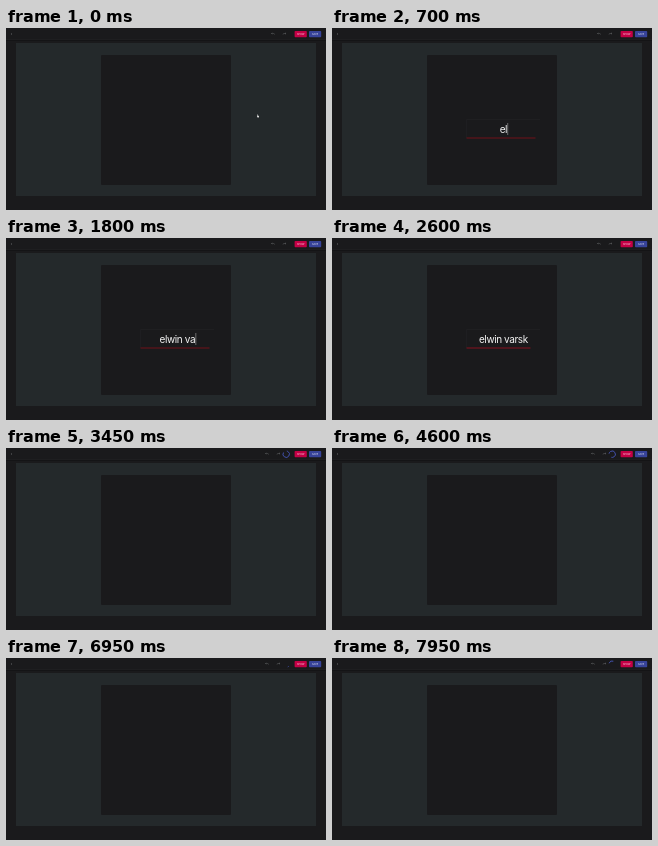
An HTML page for the animation above (8000 ms loop, 320 by 182 pixels).

```html
<!DOCTYPE html>
<html lang="en">
<head>
<meta charset="utf-8">
<title>Text editor</title>
<style>
  html, body { margin: 0; width: 100%; height: 100%; overflow: hidden; background: #1a1a1c; }
  svg { display: block; width: 100vw; height: 100vh; }
  text { font-family: Inter, "Liberation Sans", sans-serif; text-anchor: middle; }
  .label { font-size: 2.4px; font-weight: 500; fill: #fff; opacity: .75; }
  .icon { fill: none; stroke: #66686a; stroke-width: .5; }
</style>
</head>
<body>
<svg viewBox="0 0 320 182">
  <rect width="320" height="182" fill="#1a1a1c"/>
  <rect y="11" width="320" height="1" fill="#1e1e20"/>
  <rect y="12" width="320" height="1" fill="#141416"/>
  <path d="M6 5L5 6L6 7" class="icon"/>
  <g id="history" class="icon">
    <path d="M265.5 5.5h2q1 0 1 1M266.3 4.8l-.8.7l.8.7M280 5.5h-2q-1 0-1 1M279.2 4.8l.8.7l-.8.7"/>
  </g>
  <rect x="288.6" y="3" width="12.2" height="6.2" rx=".8" fill="#c40046"/>
  <rect x="303" y="3" width="12.2" height="6.2" rx=".8" fill="#37439a"/>
  <text class="label" x="294.7" y="6.5">SHOW</text>
  <text class="label" x="309.1" y="6.5">SAVE</text>

  <rect x="10" y="15" width="300" height="153" fill="#24292b"/>
  <rect x="95" y="27" width="130" height="130" rx="1" fill="#1a1a1c"/>

  <path id="pointer" d="M251.4 86.5v1.5l-.5.2l.7 1.2h1.2l.2-1.5l-1-.3v-1.1z" fill="#e8e8e8"/>

  <g id="field">
    <path d="M134.5 110V91.5H208" fill="none" stroke="#222225" stroke-width=".7"/>
    <rect id="underline" x="134.5" y="109.5" height="1"/>
    <text id="entry" x="171.4" y="104.8" font-size="10" letter-spacing="-.4" fill="#f4f4f4"></text>
    <rect id="caret" y="95" width=".6" height="12" fill="#a2a2a2"/>
  </g>
  <circle id="spinner" cx="280.2" cy="6.2" r="3.2" fill="none" stroke="#4757bd" stroke-width=".8"/>
</svg>
<script>
  const LOOP = 8000, SAVE = 2620, TURN = 1400;
  const name = "elwin varsk";
  const keyTimes = [450, 600, 750, 900, 1050, 1350, 1550, 1700, 1900, 2050, 2200];
  const el = id => document.getElementById(id);
  const [history, pointer, field, underline, entry, caret, spinner] =
    ["history", "pointer", "field", "underline", "entry", "caret", "spinner"].map(el);
  const show = (node, on) => { node.style.display = on ? "" : "none"; };
  const clamp = v => Math.max(0, Math.min(1, v));

  // Cubic ease-in-out with control points (.42, 0) and (.58, 1).
  function ease(x) {
    let low = 0, high = 1, s = .5;
    for (let i = 0; i < 18; i++) {
      s = (low + high) / 2;
      const at = 3 * (1 - s) ** 2 * s * .42 + 3 * (1 - s) * s * s * .58 + s ** 3;
      if (at < x) low = s; else high = s;
    }
    return s * s * (3 - 2 * s);
  }

  function drawSpinner(t) {
    const p = ((t - SAVE) % TURN) / TURN;
    const grow = ease(clamp(p * 2));
    const trail = ease(clamp(p * 2 - 1));
    const round = 2 * Math.PI * 3.2;
    const unit = round / 126.9;
    const start = 15 * grow + 110 * trail;
    const length = Math.min(1 + 99 * grow, 126.9 - start);
    spinner.setAttribute("stroke-dasharray", `${length * unit} ${round * 2}`);
    spinner.setAttribute("stroke-dashoffset", -start * unit);
    spinner.setAttribute("transform", `rotate(${p * 360} 280.2 6.2)`);
  }

  function draw(t) {
    const saving = t >= SAVE;
    const focused = t >= 250 && t < 2450;
    show(pointer, t < 50);
    show(field, t >= 250 && !saving);
    show(spinner, saving);
    history.setAttribute("transform", `translate(${saving ? -6 : 0} 0)`);
    if (saving) return drawSpinner(t);

    const typed = name.slice(0, keyTimes.filter(k => k <= t).length);
    if (entry.textContent !== typed) entry.textContent = typed;
    const width = typed ? entry.getComputedTextLength() : 0;
    caret.setAttribute("x", 171.8 + width / 2);
    show(caret, focused);
    underline.setAttribute("width", 69 * ease(clamp((t - 250) / 200)) - 5 * ease(clamp((t - 2400) / 200)));
    underline.setAttribute("fill", focused ? "#701018" : "#85101f");
  }

  const began = performance.now();
  function tick() {
    draw((performance.now() - began) % LOOP);
    requestAnimationFrame(tick);
  }
  tick();
</script>
</body>
</html>
```
